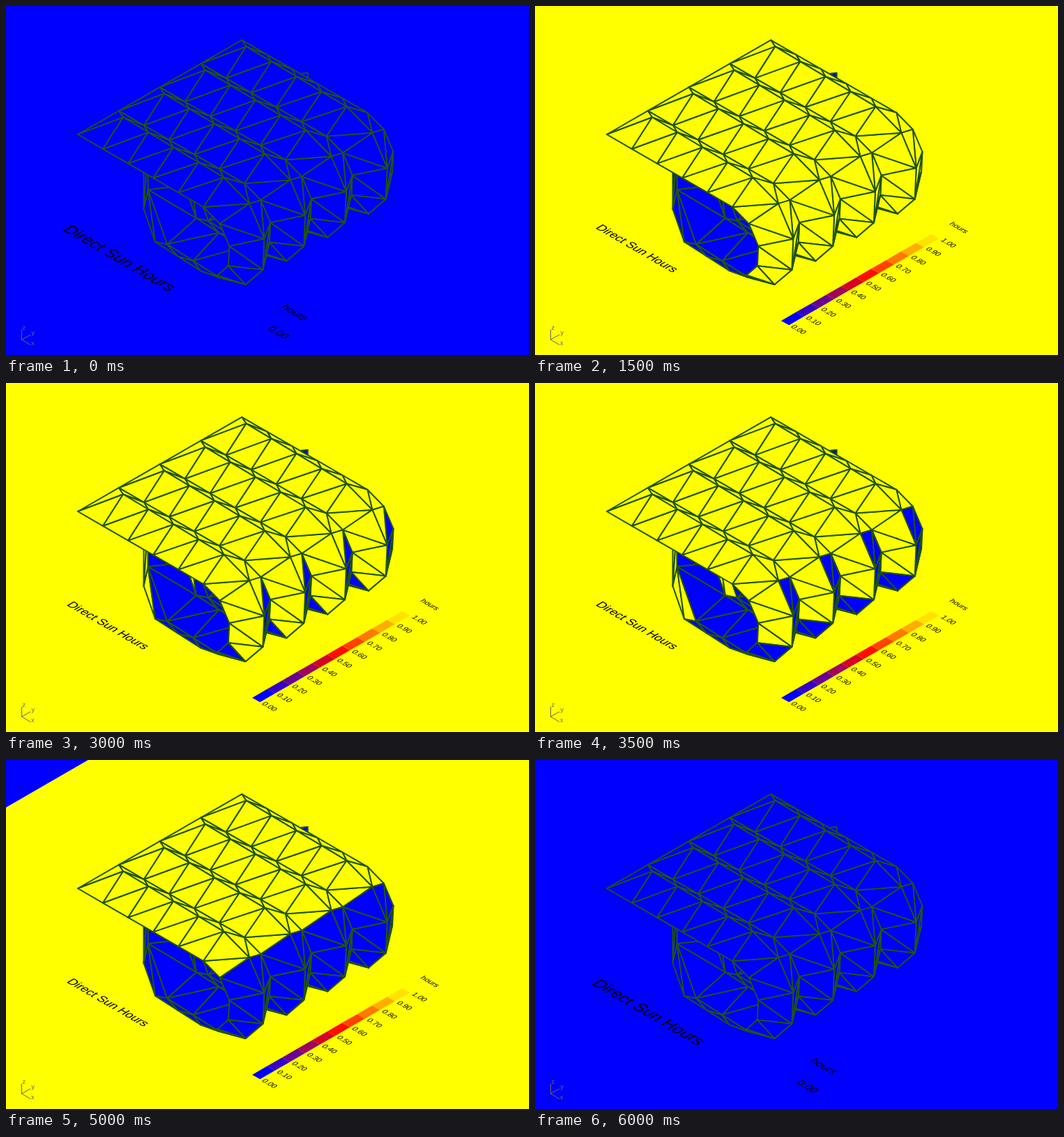
Write an HTML page that moves like this. It is 750 px wide and 500 px high and loops after 6.5 s.

```html
<!DOCTYPE html>
<html lang="en">
<head>
<meta charset="utf-8">
<title>Direct Sun Hours</title>
<style>
html, body { margin: 0; width: 100%; height: 100%; overflow: hidden; background: #ff0; }
svg { display: block; width: 750px; height: 500px; }
text { font-family: "Liberation Sans", Arial, sans-serif; }
#shell { stroke: #22540f; stroke-linejoin: round; }
#axes { stroke: #666; fill: none; }
#axes text { stroke: none; fill: #666; font-size: 9px; }
</style>
</head>
<body>
<svg viewBox="0 0 750 500">
  <rect width="750" height="500" fill="#ff0"/>
  <path id="shade" fill="#00f"/>
  <g id="scale"></g>
  <g id="plain"></g>
  <g id="shell"></g>
  <g id="axes"><path d="M22.5 464V478L35 471M22.5 478L35 485.5"/></g>
</svg>
<script>
const BLUE = '#00f', YELLOW = '#ff0', STEP = 500, STEPS = 13;
const $ = id => document.getElementById(id);
const shade = $('shade'), scale = $('scale'), plain = $('plain'), shell = $('shell'), axes = $('axes');

function add(parent, tag, attrs, content) {
  const el = document.createElementNS('http://www.w3.org/2000/svg', tag);
  for (const k in attrs) el.setAttribute(k, attrs[k]);
  if (content) el.textContent = content;
  parent.appendChild(el);
  return el;
}

// Text lying on the ground plane, baseline along the x axis.
function isoText(parent, str, x, y, size) {
  add(parent, 'text', {
    transform: `matrix(.866 .5 -.866 .5 ${x} ${y})`, 'font-size': size
  }, str);
}

// Blue to red, then red to yellow
function ramp(i) {
  const v = 53.5 * i;
  return v < 255 ? `rgb(${v},0,${255 - v})` : `rgb(255,${v - 255},0)`;
}

for (let i = 0; i <= 10; i++) {
  const x = 21.5 * i, y = -12.4 * i;
  if (i < 10)
    add(scale, 'path', { fill: ramp(i), d: `M${353 + x} ${451 + y}l21.5 -12.4l11.3 6.2l-21.5 12.4z` });
  isoText(scale, (i / 10).toFixed(2), 366 + x, 460 + y, 10.7);
}
isoText(scale, 'hours', 593.5, 312.5, 10.7);
isoText(scale, 'Direct Sun Hours', 86, 318, 16.9);

isoText(plain, 'Direct Sun Hours', 80, 321, 23.2);
isoText(plain, 'hours', 393.5, 432, 15.2);
isoText(plain, '0.00', 374, 463, 15);

add(axes, 'text', { x: 23.5, y: 464 }, 'z');
add(axes, 'text', { x: 36.5, y: 471 }, 'y');
add(axes, 'text', { x: 36, y: 486 }, 'x');

// Walks one section of the vault: flat roof, curled front, floor, back wall.
// Headings are degrees in the vertical x-z plane, drawn isometrically.
function section(x, y, flats, tilt, curl, floor, back) {
  const pts = [[x, y]];
  const walk = (deg, len) => {
    const a = deg * Math.PI / 180, run = len * Math.cos(a), drop = len * Math.sin(a);
    pts.push([x += .866 * run, y += .5 * run + drop]);
  };
  for (let i = 0; i < flats; i++) walk(tilt, 41.6);
  for (let i = 0; i < 5; i++) walk(21 + 36 * i, curl);
  walk(183, floor);
  walk(183, floor);
  walk(243, back);
  walk(270, 60);
  return pts;
}

const valley = section(103, 184, 5, 0, 29, 37.5, 42);
const ridge = section(168, 159.5, 4, 1, 45.5, 43, 70);
const at = (curve, bay, k) => [curve[k][0] + 58.8 * bay, curve[k][1] - 33.8 * bay];
const faces = [];

function face(kind, id, ...pts) {
  const points = pts.map(p => p.map(v => v.toFixed(1)).join()).join(' ');
  faces.push({ kind, id, el: add(shell, 'polygon', { points }) });
}

// One strip of triangles between a valley and the ridge beside it
function strip(kind, bay, first, last) {
  const side = kind === 'back' ? bay + 1 : bay;
  for (let k = last; k >= first; k--) {
    const v = at(valley, side, k), v2 = at(valley, side, k + 1), r = at(ridge, bay, k);
    face(kind, 2 * k, v, v2, r);
    if (k + 1 < ridge.length) face(kind, 2 * k + 1, v2, r, at(ridge, bay, k + 1));
  }
}

// The inside of the vault first, then the outside, each from far to near
for (const [first, last] of [[9, 13], [0, 8]])
  for (let bay = 3; bay >= 0; bay--) {
    strip('back', bay, first, last);
    if (!first) face('end', 0, at(valley, bay, 0), at(ridge, bay, 0), at(valley, bay + 1, 0));
    strip('front', bay, first, last);
  }

// The lit window slides along the section as the sun crosses the sky.
function show(step) {
  const night = step % (STEPS - 1) === 0, dusk = step === 11;
  const from = dusk ? 5 : 0;
  const to = Math.max(11, Math.round(22.4 - 1.1 * step));
  const inside = step < 10 ? 30 - step : Infinity;
  const lit = {
    front: id => id >= from && id < Math.min(to, 17) || id >= inside,
    back: id => id >= from && id < Math.max(11, to - 4),
    end: () => step > 2 && !dusk
  };
  for (const { el, kind, id } of faces)
    el.setAttribute('fill', !night && lit[kind](id) ? YELLOW : BLUE);

  const edge = night ? 2000 : Math.max(0, 68 + 420 * (step - 10));
  shade.setAttribute('d', `M0 0V${edge}L${edge / .5775} 0z`);
  scale.style.display = night ? 'none' : '';
  plain.style.display = night ? '' : 'none';
  shell.style.strokeWidth = night ? 1.8 : 2;
}

let current = -1;
const start = performance.now();
function tick() {
  const step = Math.floor((performance.now() - start) / STEP) % STEPS;
  if (step !== current) show(current = step);
  requestAnimationFrame(tick);
}
tick();
</script>
</body>
</html>
```
